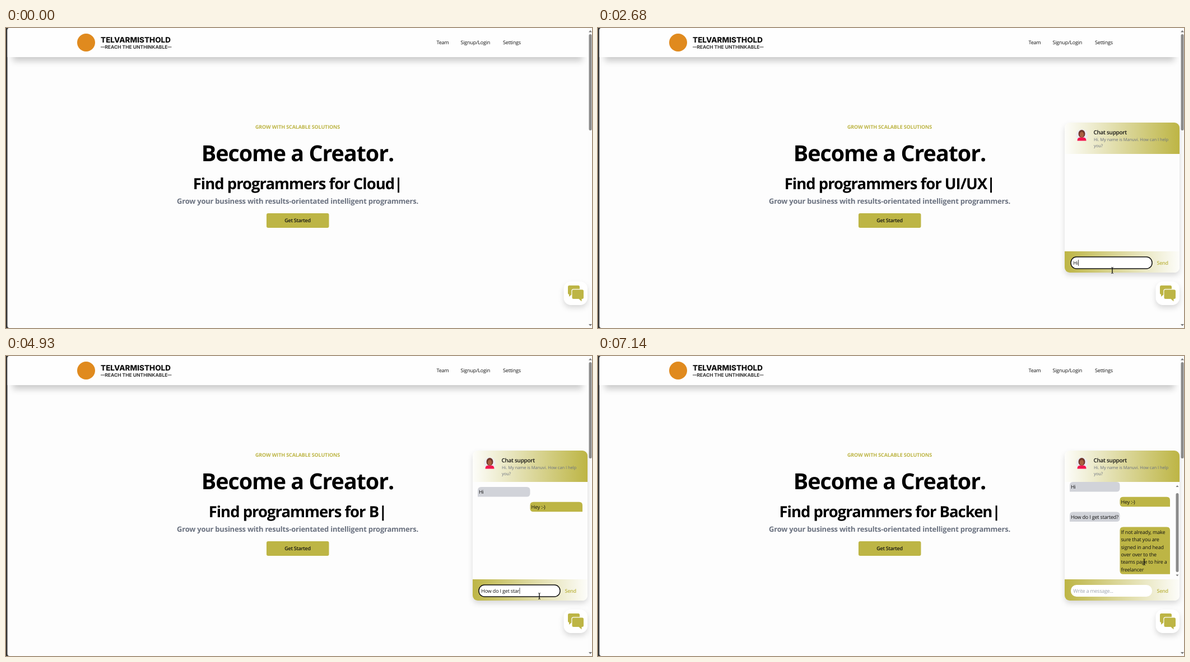
An HTML page that plays this animation: 1046 px wide and 536 px high, repeating every 7.19 s.

```html
<!DOCTYPE html>
<html lang="en">
<head>
<meta charset="utf-8">
<title>Chat support</title>
<style>
  html, body { margin: 0; height: 100%; overflow: hidden; background: #333; }
  svg { display: block; width: 1046px; height: 536px; }
  text { font: 9px "Open Sans", "Noto Sans", sans-serif; letter-spacing: -.02em; fill: #111;
         text-rendering: geometricPrecision; white-space: pre; }
  .mid { text-anchor: middle; }
  .olive { fill: #bdb545; }
  .gray { fill: #6b7280; }
  .semi { font-weight: 600; letter-spacing: -.03em; }
  .bold { font-weight: 700; }
  .brand { font: 800 13.5px Inter, sans-serif; letter-spacing: 0; }
  .motto { font: 700 8.5px Inter, sans-serif; letter-spacing: 0; fill: #333; }
  .shadow { filter: drop-shadow(0 5px 5px rgba(0, 0, 0, .14)); }
</style>
</head>
<body>
<svg viewBox="0 0 1046 536">
  <defs>
    <linearGradient id="toOlive"><stop stop-color="#fdfdfa"/><stop offset="1" stop-color="#bdb545"/></linearGradient>
    <linearGradient id="fromOlive"><stop stop-color="#bdb545"/><stop offset="1" stop-color="#fdfdfa"/></linearGradient>
    <clipPath id="panel"><rect x="833" y="169" width="205" height="268" rx="9"/></clipPath>
    <clipPath id="list"><rect x="833" y="225" width="205" height="174"/></clipPath>
  </defs>

  <rect x="2.5" width="1060" height="536" rx="4" fill="#fdfdfd"/>

  <!-- header -->
  <rect x="12" y="30" width="1017" height="29" opacity=".2" style="filter: blur(6px)"/>
  <path d="M2.5 52V4q0-4 4-4H1038V52z" fill="#fefefe"/>
  <circle cx="143" cy="26" r="16" fill="#e08a1e"/>
  <text class="brand" x="169" y="26">TELVARMISTHOLD</text>
  <path d="M169 34h7M288.500 34h7" stroke="#333" stroke-width="1.200"/>
  <text class="motto mid" x="232.300" y="37">REACH THE UNTHINKABLE</text>
  <text x="768.500" y="28.500">Team</text>
  <text x="811.500" y="28.500">Signup/Login</text>
  <text x="887" y="28.500">Settings</text>

  <!-- hero -->
  <text class="mid bold olive" x="520.500" y="180" style="letter-spacing: -.015em">GROW WITH SCALABLE SOLUTIONS</text>
  <text class="mid bold" x="520.500" y="238" style="font-size: 39.5px; letter-spacing: -.0265em; fill: #000">Become a Creator.</text>
  <text class="mid bold" id="typed" x="520.500" y="288" style="font-size: 27.5px; letter-spacing: -.037em; fill: #000"></text>
  <text class="mid bold gray" x="520.500" y="314" style="font-size: 13px; letter-spacing: -.018em">Grow your business with results-orientated intelligent programmers.</text>
  <rect class="olive" x="465" y="331" width="111.500" height="26" rx="3"/>
  <text class="mid semi" x="520.500" y="347.300">Get Started</text>

  <!-- page scrollbar -->
  <rect x="1038" width="8" height="536" fill="#fcfcfc"/>
  <rect x="1040.500" y="11" width="5" height="172" rx="2.500" fill="#8b8b8b"/>
  <path d="M1040 7.500h6l-3-3.500zM1040 529h6l-3 3.500z" fill="#777"/>

  <!-- chat button -->
  <rect class="shadow" x="995.500" y="453" width="42.500" height="42" rx="13" fill="#fff"/>
  <rect class="olive" x="1003" y="460" width="21" height="16" rx="2.500"/>
  <path class="olive" d="M1005 475v5l5-4z"/>
  <path class="olive" d="M1013 467.500H1028.500q2.500 0 2.500 2.500V481.500q0 2.500-2.500 2.500H1027.500V488.500L1022.500 484H1013q-2.500 0-2.500-2.500V470q0-2.500 2.500-2.500z" stroke="#fff" stroke-width="2.400" paint-order="stroke"/>

  <!-- chat panel -->
  <g id="chat">
    <rect class="shadow" x="833" y="169" width="205" height="268" rx="9" fill="#fdfdfd"/>
    <g clip-path="url(#panel)">
      <rect x="833" y="169" width="205" height="56" fill="url(#toOlive)"/>
      <rect x="833" y="399" width="205" height="38" fill="url(#fromOlive)"/>
    </g>
    <circle cx="863.500" cy="191.500" r="10.500" fill="#ececf0"/>
    <ellipse cx="863.500" cy="189" rx="6" ry="7" fill="#71382c"/>
    <path d="M855.500 201.500q0-6 5-6h6q5 0 5 6z" fill="#f3174f"/>
    <ellipse cx="863.500" cy="190.500" rx="3.700" ry="5" fill="#a9603f"/>
    <text class="semi" x="884.500" y="190" style="font-size: 10px">Chat support</text>
    <g class="gray">
      <text class="gray" x="885" y="202" style="font-size: 7.6px; letter-spacing: -.01em">Hi. My name is Manuvi. How can I help</text>
      <text class="gray" x="885" y="213.300" style="font-size: 7.6px; letter-spacing: -.01em">you?</text>
    </g>
    <g id="msgs" clip-path="url(#list)"></g>
    <rect id="field" x="844" y="409" width="145" height="21" rx="10" fill="#fff" stroke="#111"/>
    <text id="input" x="848.300" y="422.700"></text>
    <path id="caret" d="M0 414v11" stroke="#222" stroke-width=".8"/>
    <text class="semi olive" x="997.500" y="422.700">Send</text>
  </g>

  <g id="mouse">
    <path id="beam" d="M-2-5.500q2 0 2 1.500V4q0 1.500-2 1.500M2-5.500Q0-5.500 0-4V4Q0 5.500 2 5.500" fill="none" stroke="#111" stroke-width=".9"/>
    <path id="hand" d="M-2.600 1V-5.500q1.200-1.500 2.300 0V-1.500l3.800 1q1.200.4 1.200 1.700V3.500L3.500 7H-2.200L-5.200 2.500q-.5-1.600 1-1.800z" fill="#fff" stroke="#111" stroke-width="1" stroke-linejoin="round"/>
    <path id="arrow" d="M0 0V11L2.600 8.500 4.300 12.300 6 11.500 4.300 7.800H7.700z" fill="#fff" stroke="#111" stroke-width=".8"/>
  </g>
</svg>
<script>
const LOOP = 7190, STEP = 170, HOLD = 1270;
const $ = id => document.getElementById(id);
const show = (id, on) => $(id).style.display = on ? '' : 'none';
const clamp = (v, lo, hi) => Math.min(hi, Math.max(lo, v));
const ease = k => k * k * (3 - 2 * k);

// Letters seen of a word that starts typing at `start`, rests, then is erased.
function typedWord(word, start, t) {
  const full = start + (word.length - 1) * STEP;
  const n = t < full + HOLD
    ? Math.floor((t - start) / STEP) + 1
    : word.length - 1 - Math.floor((t - full - HOLD) / STEP);
  return word.slice(0, clamp(n, 0, word.length));
}

// time, x, y
const path = [
  [80, 870, 550], [520, 1015, 476], [760, 1015, 476], [1120, 920, 432],
  [1900, 918, 433], [2950, 918, 433], [3400, 998, 412], [3550, 1006, 419],
  [3680, 1006, 419], [4000, 952, 429], [5250, 952, 429], [5660, 1020, 433],
  [5850, 1010, 421], [6020, 1010, 421], [6500, 975, 368], [LOOP, 975, 368]
];

function drawMouse(t) {
  show('mouse', t >= path[0][0]);
  if (t < path[0][0]) return;
  const i = path.findIndex(p => p[0] > t);
  const [t0, x0, y0] = path[i - 1], [t1, x1, y1] = path[i];
  const k = ease((t - t0) / (t1 - t0));
  const x = x0 + (x1 - x0) * k, y = y0 + (y1 - y0) * k;
  const kind = x > 990 && y > 400 ? 'hand' : t > 760 ? 'beam' : 'arrow';
  for (const id of ['beam', 'hand', 'arrow']) show(id, id === kind);
  $('mouse').setAttribute('transform', `translate(${x} ${y})`);
}

const talk = [
  [3620, 'Hi'],
  [3700, 'Hey :-)'],
  [5960, 'How do I get started?'],
  [6080, 'If not already, make', 'sure that you are', 'signed in and head',
    'over over to the', 'teams page to hire a', 'freelancer']
];

function bubble(y, w, lines, reply) {
  const x = 842 + (reply ? w : 0), h = 4 + 13.4 * lines.length, r = 6;
  const [br, bl] = reply ? [0, r] : [r, 0];
  const d = `M${x + r} ${y}H${x + w - r}q${r} 0 ${r} ${r}V${y + h - br}q0 ${br} ${-br} ${br}`
    + `H${x + bl}q${-bl} 0 ${-bl} ${-bl}V${y + r}q0 ${-r} ${r} ${-r}z`;
  return `<path d="${d}" fill="${reply ? '#bdb545' : '#d1d3d9'}"/>`
    + lines.map((s, i) => `<text x="${x + 2}" y="${y + 12.3 + 13.4 * i}">${s}</text>`).join('');
}

function drawTalk(t) {
  const overflow = t >= talk[3][0];
  const scroll = 9 * ease(clamp((t - 6550) / 120, 0, 1));
  let y = 234 - scroll, html = '';
  talk.forEach(([at, ...lines], i) => {
    if (t < at) return;
    html += bubble(y, overflow ? 89.5 : 93.5, lines, i % 2);
    y += 13.4 * (lines.length + 1);
  });
  if (overflow) html += `<rect x="1031.500" y="${237 + scroll * .9}" width="5" height="141" rx="2.500" fill="#8b8b8b"/>`
    + '<path d="M1031.500 234h5l-2.500-3zM1031.500 390.500h5l-2.500 3z" fill="#777"/>';
  $('msgs').innerHTML = html;
}

function drawInput(t) {
  const focus = t >= 1400 && t < 3600 || t >= 4000 && t < 5940;
  const second = t >= 3600;
  const [text, start, gap] = second ? ['How do I get started?', 4350, 35] : ['Hi', 2350, 150];
  const n = t >= 5940 ? 0 : clamp(Math.floor((t - start) / gap) + 1, 0, text.length);
  const input = $('input');
  input.textContent = n ? text.slice(0, n) : 'Write a message...';
  input.style.fill = n ? '#111' : '#9ca3af';
  input.style.letterSpacing = n ? '-.02em' : '-.03em';
  $('field').setAttribute('stroke-width', focus ? 1.5 : 0);
  // the blink restarts at each key press
  const since = t - (n ? start + (n - 1) * gap : second ? 4000 : 1400);
  show('caret', focus && Math.floor(since / 500) % 2 === 0);
  const x = 849 + (n ? input.getComputedTextLength() : 0);
  $('caret').setAttribute('transform', `translate(${x} 0)`);
}

function draw(t) {
  const word = t < 1950 ? typedWord('Cloud', 1120 - HOLD - 4 * STEP, t)
    : t < 4700 ? typedWord('UI/UX', 1980, t)
    : typedWord('Backend', 4780, t);
  $('typed').textContent = `Find programmers for ${word}|`;
  show('chat', t >= 680);
  if (t >= 680) {
    drawTalk(t);
    drawInput(t);
  }
  drawMouse(t);
}

let begin;
function tick(now) {
  begin ??= now;
  draw((now - begin) % LOOP);
  requestAnimationFrame(tick);
}
draw(0);
requestAnimationFrame(tick);
</script>
</body>
</html>
```
